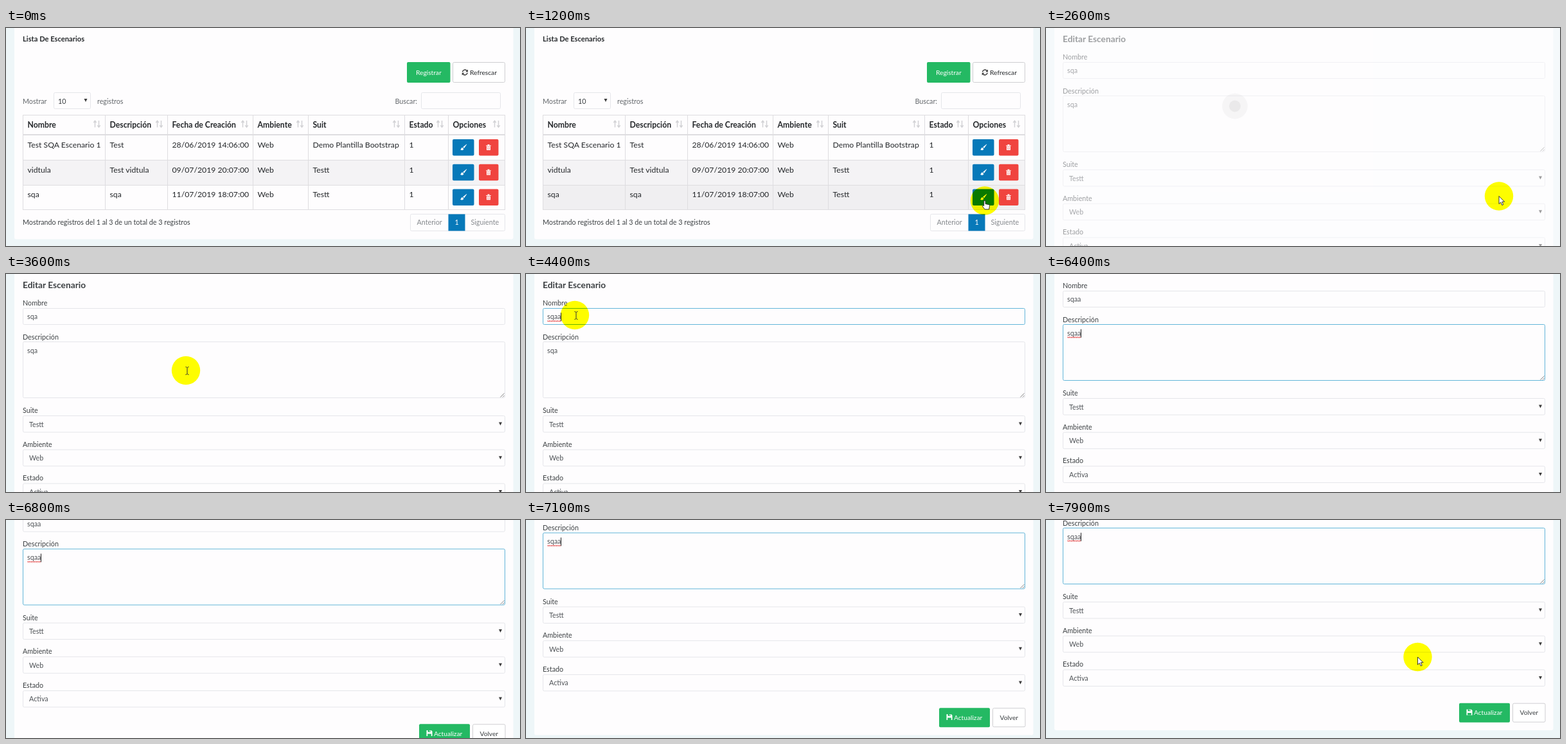
Recreate the animation shown at these times as an HTML page. Size 800x339 px, loop 8 s.

```html
<!DOCTYPE html>
<html lang="es">
<head>
<meta charset="utf-8">
<title>Editar Escenario</title>
<style>
  html, body { margin: 0; width: 100%; height: 100%; overflow: hidden; background: #eef6f8; }
  svg { display: block; width: 100vw; height: 100vh; font-family: Lato, sans-serif; }
  text { white-space: pre; }
  .line { fill: none; stroke: #dedde0; }
  .box { fill: #fefdfe; stroke: #e5e6ea; }
  .focus { stroke: #63b6d9; }
  .ring { mix-blend-mode: multiply; }
</style>
</head>
<body>
<svg id="stage" viewBox="0 0 800 339" preserveAspectRatio="none"></svg>
<script>
const INK = '#3c4043', DARK = '#25282b', MUTED = '#63676b', BLUE = '#0779b9', GREEN = '#24b963';

const label = (x, y, str, { size = 10.75, fill = INK, weight = 400, id = '' } = {}) =>
  `<text ${id && `id="${id}"`} x="${x}" y="${y}" font-size="${size}" font-weight="${weight}" fill="${fill}">${str}</text>`;
const rect = (x, y, w, h, attrs) => `<rect x="${x}" y="${y}" width="${w}" height="${h}" ${attrs}/>`;
const box = (x, y, w, h, id = '') => rect(x, y, w, h, `rx="2" class="box" ${id && `id="${id}"`}`);
const caretDown = (x, y) => `<path d="M${x - 2.5} ${y - 2}h5l-2.5 5z" fill="#3d3d3d"/>`;
const at = (x, y, body) => `<g transform="translate(${x} ${y})">${body}</g>`;

const icons = {
  sort: `<path d="M-3 5.5v-10m-2.2 2.6L-3 -4.8l2.2 2.9M3 -5v10m-2.2-2.6L3 5.3l2.2-2.9" fill="none" stroke="#d2d2d5" stroke-width="1.5"/>`,
  brush: `<path d="M5 -5L-.8 -.3 1 1.6 5.2 -4.4zM-1.6 .4C-4 .4 -3.2 3 -5 3.6-3 5.2.6 4.6.2 2.2z" fill="#fff"/>`,
  trash: `<path d="M-3.8 -3h2.4v-1.4h2.8V-3h2.4v1.2h-7.6z" fill="#fff"/><path d="M-3 -1.2h6v5.6h-6z" fill="#fff"/><path d="M-1.2 0v3.4M1.2 0v3.4" stroke="#f0443f" stroke-width=".7"/>`,
  refresh: `<path d="M-3.8 -.6A3.9 3.9 0 0 1 3 -2.7M3.8 .6A3.9 3.9 0 0 1 -3 2.7" fill="none" stroke="#333" stroke-width="1.4"/><path d="M4.6 -4.6v3.8H.9zM-4.6 4.6V.8h3.7z" fill="#333"/>`,
  save: `<path d="M-4.5 -4.5h7.3l1.7 1.7v7.3h-9z" fill="#fff"/><path d="M-2.4 -4.5h4.2v2.8h-4.2zM-2.8 1h5.6v3.5h-5.6z" fill="${GREEN}"/><path d="M.2 -4.5h1v2h-1z" fill="#fff"/>`
};

const columns = [
  [26.5, 'Nombre'], [154.5, 'Descripción'], [251.5, 'Fecha de Creación'], [384.5, 'Ambiente'],
  [470.5, 'Suit'], [620.5, 'Estado'], [688.5, 'Opciones'], [776.5]
];
const rows = [
  ['Test SQA Escenario 1', 'Test', '28/06/2019 14:06:00', 'Web', 'Demo Plantilla Bootstrap', '1'],
  ['vidtula', 'Test vidtula', '09/07/2019 20:07:00', 'Web', 'Testt', '1'],
  ['sqa', 'sqa', '11/07/2019 18:07:00', 'Web', 'Testt', '1']
];

function listPage() {
  let out = rect(13, -10, 776.5, 338.5, 'rx="3" fill="#fefdfe"');
  out += label(26, 20.5, 'Lista De Escenarios', { size: 11.2, weight: 700, fill: DARK });
  out += rect(624, 53, 67.5, 32, `rx="2" fill="${GREEN}"`) + label(638, 72.5, 'Registrar', { size: 10.2, fill: '#fff' });
  out += rect(695.5, 53.5, 81, 31, 'rx="2" fill="#fff" stroke="#cfcfd2"') + at(714.3, 69, icons.refresh)
       + label(722, 72.5, 'Refrescar', { size: 10.2, fill: DARK });
  out += label(26, 117.7, 'Mostrar', { fill: MUTED }) + box(74.5, 100.5, 57, 25) + label(81, 117.7, '10')
       + caretDown(124, 112) + label(142, 117.7, 'registros', { fill: MUTED });
  out += label(605.5, 117.7, 'Buscar:', { fill: MUTED }) + box(646.5, 100.5, 123, 25);
  out += rect(26.5, 205.5, 750, 38.5, 'fill="#f4f3f5"');
  out += rect(26.5, 244, 750, 38, 'id="hoverRow" fill="#f0eff1"');

  const last = columns.length - 1;
  columns.forEach(([x, name], i) => {
    out += `<path class="line" d="M${x} 135V282.5"/>`;
    if (i === last) return;
    out += label(x + 7, 155, name, { size: 12.24, weight: 700, fill: DARK }) + at(columns[i + 1][0] - 13, 149, icons.sort);
    rows.forEach((row, r) => out += label(x + 7, 185.7 + r * 38.8, row[i] || '', { size: 12.24, fill: DARK }));
  });
  [135.5, 166.5, 205.5, 244.5, 282.5].forEach(y => out += `<path class="line" d="M26 ${y}H777"/>`);
  out += '<path class="line" d="M26 165.5H777"/>';
  rows.forEach((_, r) => {
    const y = 173 + r * 38.7;
    out += rect(695, y, 33.5, 25.5, `rx="2" fill="${BLUE}" ${r === 2 ? 'id="editButton"' : ''}`) + at(712, y + 12.5, icons.brush);
    out += rect(736, y, 30.5, 25.5, 'rx="2" fill="#f0443f"') + at(751, y + 12.5, icons.trash);
  });

  out += label(26, 305.7, 'Mostrando registros del 1 al 3 de un total de 3 registros');
  out += box(629.5, 289.5, 147, 26) + rect(688.5, 289.5, 26, 26, `fill="${BLUE}"`);
  out += label(639.5, 306.3, 'Anterior', { fill: '#85898d' }) + label(698.5, 306.3, '1', { fill: '#fff' })
       + label(723.5, 306.3, 'Siguiente', { fill: '#85898d' });
  return out;
}

const typedField = (id, y) => label(33, y, 'sqa', { id: id + 'Text', fill: '#505458' })
  + `<g id="${id}Mark">${rect(33, y + 1.5, 17, 2.6, 'fill="url(#wave)"')}<path d="M0 ${y - 10}v13" stroke="#222"/></g>`;

function formPage() {
  let out = rect(13, -10, 776.5, 430, 'rx="3" fill="#fefdfe"');
  out += label(26, 21.7, 'Editar Escenario', { size: 13.75, weight: 700, fill: INK });
  out += label(26, 48.8, 'Nombre') + box(26.5, 53.5, 750, 25, 'nameBox') + typedField('name', 70.3);
  out += label(26, 101.6, 'Descripción') + box(26.5, 105.5, 750, 87, 'descBox') + typedField('desc', 122.8);
  out += '<path d="M769.5 191.5l6-6M773 191.5l2.5-2.5" stroke="#777" stroke-width=".9"/>';
  [['Suite', 'Testt'], ['Ambiente', 'Web'], ['Estado', 'Activa']].forEach(([name, value], i) => {
    const y = 220.5 + i * 52.7;
    out += label(26, y - 4.5, name) + box(26.5, y, 750, 25.5) + label(36, y + 17, value, { fill: '#505458' }) + caretDown(769.5, y + 12);
  });
  out += rect(643, 377.7, 79, 30, `rx="2" fill="${GREEN}"`) + at(659, 392, icons.save)
       + label(666, 396.3, 'Actualizar', { size: 10.2, fill: '#fff' });
  out += rect(726.5, 378.2, 50.5, 29, 'rx="2" fill="#fff" stroke="#cfcfd2"') + label(737.5, 396.3, 'Volver', { size: 10.2 });
  return out;
}

const pointers = {
  arrow: '<path d="M0 0v12l2.8-2.6 2 4.6 2-.9-2-4.4h3.8z" fill="#fff" stroke="#222" stroke-width=".9"/>',
  hand: '<path d="M-1.3 8V1.2a1.2 1.2 0 0 1 2.4 0V5l5.4 1.2q1.2.4 1 1.8l-.9 5.5H.2L-3.8 8.6q.8-1.6 2.5-.6z" fill="#fff" stroke="#222" stroke-width=".9"/>',
  beam: '<path d="M-.5 -5.5q2 0 2.5 1.2q.5-1.2 2.5-1.2M-.5 6.5q2 0 2.5-1.2q.5 1.2 2.5 1.2M2 -4.5v10" fill="none" stroke="#333"/>'
};

const stage = document.getElementById('stage');
stage.innerHTML = `
  <defs><pattern id="wave" width="4" height="2.6" patternUnits="userSpaceOnUse" y="1.8">
    <path d="M0 2l1-1.4 2 1.4 1-1.4" fill="none" stroke="#e33b3b" stroke-width=".9"/></pattern></defs>
  ${rect(0, 0, 800, 339, 'fill="#eef6f8"')}
  <g id="list">${listPage()}</g>
  <g id="form">${formPage()}</g>
  <g id="loader">${rect(0, 0, 800, 339, 'fill="#fefdff"')}
    <circle cx="294" cy="121.5" r="9" fill="#333" opacity=".13"/><circle id="pulse" cx="294" cy="121.5" fill="#333"/></g>
  <circle id="ring" class="ring" r="22.2" fill="#ff0"/>
  <g id="pointer">${Object.entries(pointers).map(([k, v]) => `<g id="${k}">${v}</g>`).join('')}</g>`;

const $ = id => document.getElementById(id);
const show = (id, on) => $(id).style.display = on ? '' : 'none';

// Each path is a list of [time, ...values]; outside its span it yields null.
function sample(path, t) {
  const i = path.findIndex(key => key[0] >= t);
  if (i < 0 || t < path[0][0]) return null;
  if (i === 0) return path[0].slice(1);
  const [a, b] = [path[i - 1], path[i]];
  const k = (t - a[0]) / (b[0] - a[0]);
  return a.slice(1).map((v, n) => v + (b[n + 1] - v) * k);
}

const journeys = [
  [[100, 598, 216], [200, 602, 205], [400, 602, 205], [600, 655, 232], [900, 746, 292], [1100, 725, 277],
   [1300, 703, 260], [1400, 706, 262], [1500, 705, 261.5], [2800, 705, 261.5], [3100, 590, 240], [3500, 330, 192],
   [3600, 280, 150], [3800, 145, 88], [4000, 76, 63], [4400, 76, 64], [4700, 74, 92], [4900, 72, 121], [5300, 72, 121],
   [5500, 150, 134], [5800, 442, 174]],
  [[7400, 815, 196], [7500, 770, 198], [7700, 645, 206], [7900, 578.5, 213]]
];
const scrollPath = [[0, 0], [6200, 0], [6400, 27], [7100, 85.5], [7200, 93], [8000, 93]];
const fadePath = [[1800, 1], [2500, 1], [2600, .5], [2700, .12], [2800, 0]];

function setField(id, grown, focused) {
  const text = $(id + 'Text'), mark = $(id + 'Mark');
  const value = grown ? 'sqaa' : 'sqa';
  if (text.textContent !== value) text.textContent = value;
  $(id + 'Box').classList.toggle('focus', focused);
  show(id + 'Mark', focused);
  if (!focused) return;
  const width = text.getComputedTextLength();
  mark.firstChild.setAttribute('width', width);
  mark.lastChild.setAttribute('transform', `translate(${33.5 + Math.round(width)} 0)`);
}

function draw(t) {
  const onForm = t >= 1800;
  show('list', !onForm);
  show('form', onForm);
  show('hoverRow', t >= 800 && !onForm);
  $('editButton').setAttribute('fill', t >= 1300 ? '#05659c' : BLUE);

  $('form').setAttribute('transform', `translate(0 ${-sample(scrollPath, t)[0]})`);
  setField('name', t >= 4300, t >= 4100 && t < 5000);
  setField('desc', t >= 5400, t >= 5000);

  const fade = sample(fadePath, t);
  show('loader', fade);
  if (fade) {
    const p = Math.min(1, (t - 1700) / 1000);
    $('loader').setAttribute('opacity', fade[0]);
    $('pulse').setAttribute('r', 22 * p);
    $('pulse').setAttribute('opacity', (1 - p) * .7);
  }

  const spot = journeys.map(path => sample(path, t)).find(Boolean);
  show('ring', spot);
  show('pointer', spot);
  if (!spot) return;
  const move = `translate(${spot[0]} ${spot[1]})`;
  $('ring').setAttribute('transform', move);
  $('pointer').setAttribute('transform', move);
  const kind = t >= 1200 && t < 1800 ? 'hand' : t >= 3500 && t < 6000 ? 'beam' : 'arrow';
  Object.keys(pointers).forEach(name => show(name, name === kind));
}

const start = performance.now();
function tick() {
  const t = (performance.now() - start) % 8000;
  draw(Math.floor(t / 100) * 100);
  requestAnimationFrame(tick);
}
tick();
</script>
</body>
</html>
```
